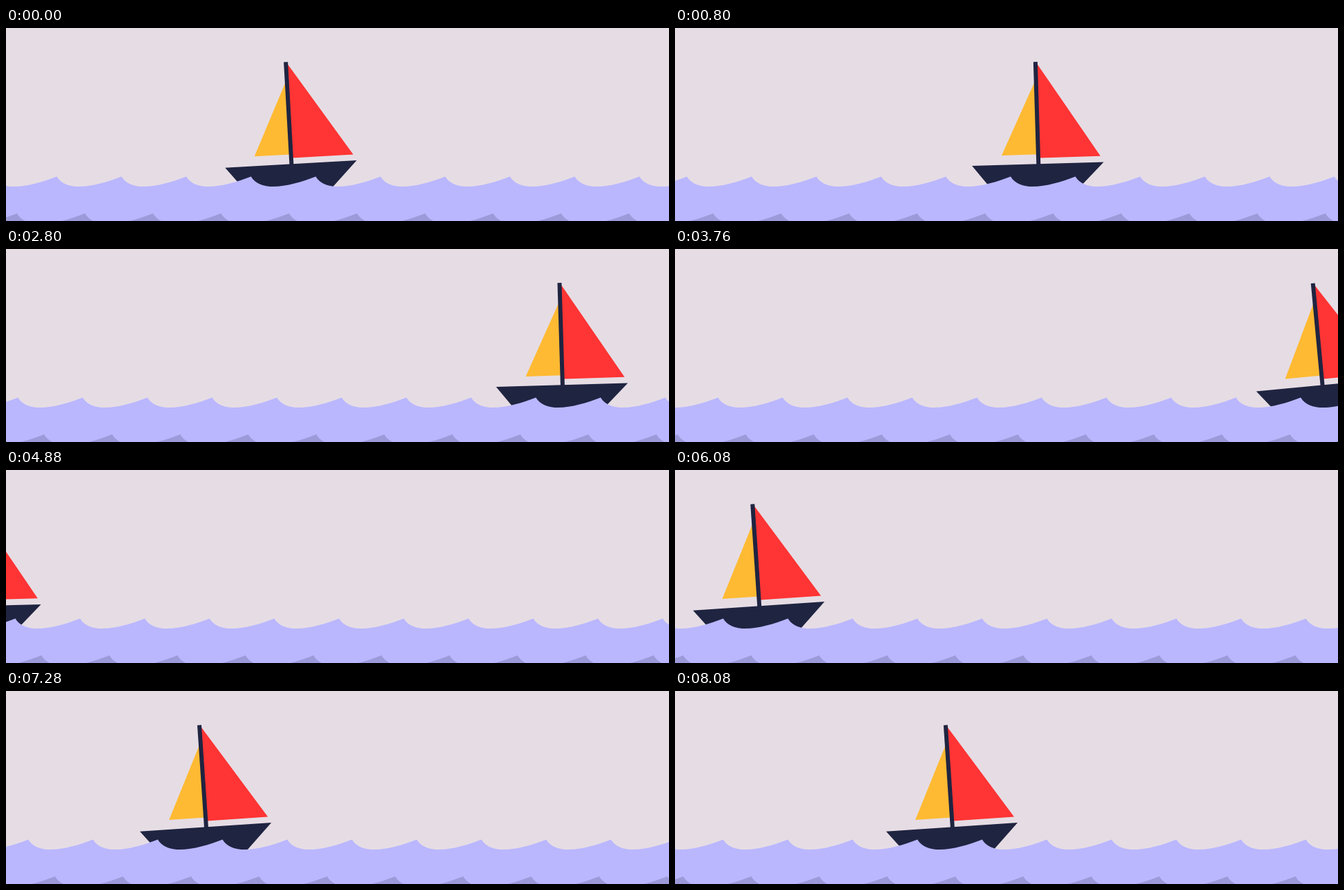
Recreate the animation shown at these times as an HTML page with a canvas. Size 960 px wide and 280 px high, loop 8160 ms.

```html
<!DOCTYPE html>
<html lang="en">
<head>
<meta charset="utf-8">
<title>Sailing boat</title>
<style>
  html, body { margin: 0; width: 100%; height: 100%; overflow: hidden; background: #e6dde4; }
  canvas { display: block; }
</style>
</head>
<body>
<canvas id="stage" width="960" height="280"></canvas>
<script>
const ctx = document.getElementById('stage').getContext('2d');
const LOOP = 8160, STEP = 80, CYCLE = 8000, START = 4680;
const mod = (a, n) => ((a % n) + n) % n;

function polygon(color, ...points) {
  ctx.fillStyle = color;
  ctx.beginPath();
  for (const [x, y] of points) ctx.lineTo(x, y);
  ctx.fill();
}

// A row of sharp-crested waves, one crest at x, filled to the bottom edge.
function waves(color, x, y, period) {
  const k = period / 93.75;
  let left = mod(x, period) - period;
  ctx.fillStyle = color;
  ctx.beginPath();
  ctx.moveTo(left, 300);
  ctx.lineTo(left, y);
  for (; left < 960; left += period) {
    ctx.bezierCurveTo(left + 15 * k, y + 25 * k, left + 60 * k, y + 13 * k, left + period, y);
  }
  ctx.lineTo(left, 300);
  ctx.fill();
}

function boat(time) {
  const crossing = mod(time + 3480, CYCLE) - 3480;
  // Eases into the tilt for one second, then plays back in reverse.
  const swing = 1 - Math.abs(mod(time - 520, 2000) / 1000 - 1);
  const tilt = 1 + 7.15 * swing ** 1.8;
  ctx.save();
  ctx.translate(415.7 + 0.1398 * crossing, 238);
  ctx.rotate(-tilt * Math.PI / 180);
  ctx.translate(0, -41);
  polygon('#ffba33', [-53, -13.7], [0, -123], [0, -13.7]);
  polygon('#ff3434', [2, -145.5], [90, -8.5], [2, -8.5]);
  polygon('#1f2441', [-3, -148], [3, -148], [3, 1], [-3, 1]);
  polygon('#1f2441', [-96.3, 0.2], [94.5, 0.2], [54.5, 40], [-65, 40]);
  ctx.restore();
}

function draw(now) {
  const t = Math.floor(mod(now, LOOP) / STEP) * STEP;
  const time = t < START ? t : t - LOOP;
  ctx.fillStyle = '#e6dde4';
  ctx.fillRect(0, 0, 960, 280);
  boat(time);
  waves('#bab7ff', 73.5 + time * 93.75 / 2000, 215.5, 93.75);
  waves('#9d9ada', 15.8 + time * 98.5 / 2000, 269, 98.5);
}

const begin = performance.now();
function frame() {
  draw(performance.now() - begin);
  requestAnimationFrame(frame);
}
frame();
</script>
</body>
</html>
```
